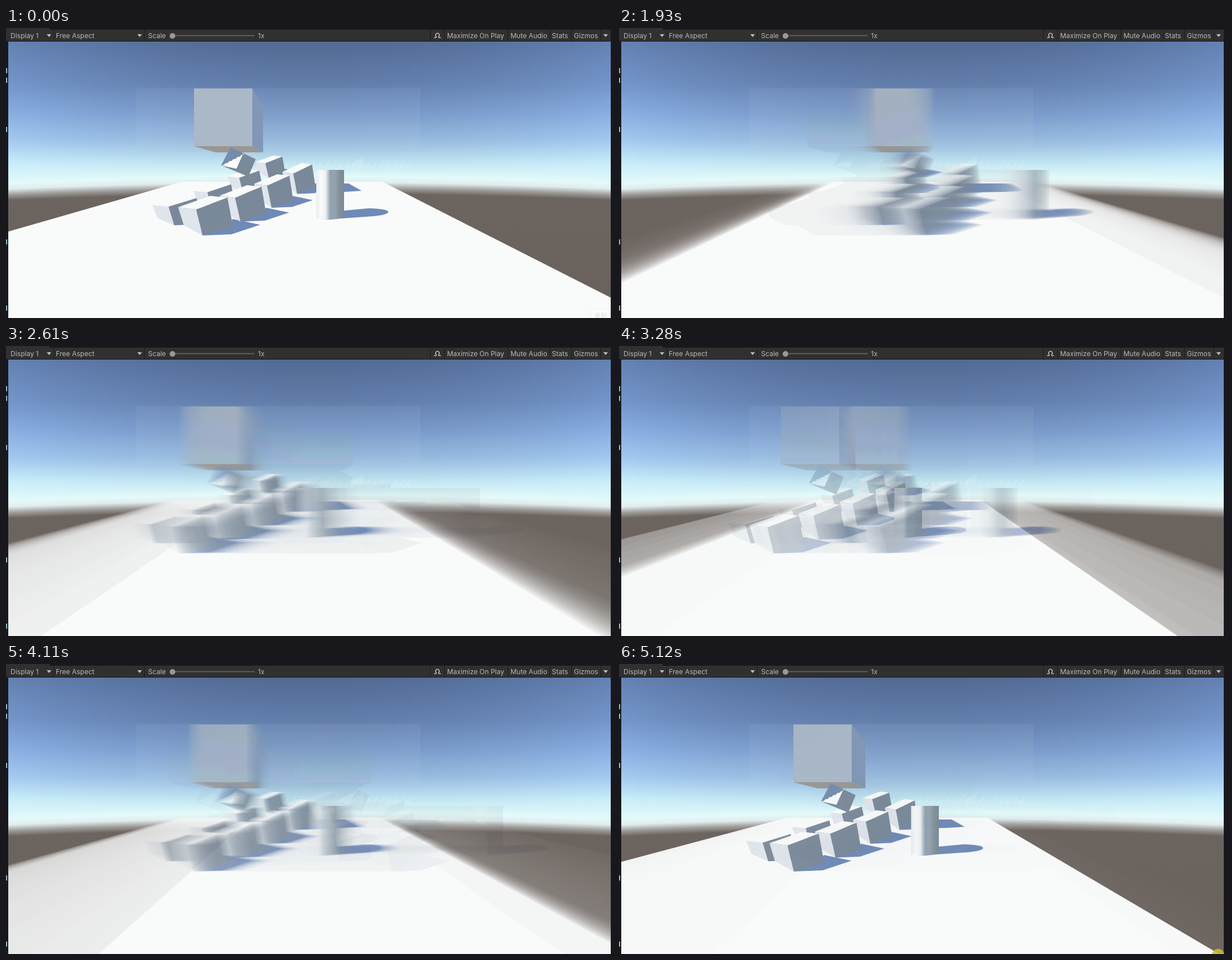
An HTML page with a canvas for the animation above (5200 ms loop, 1072x513 px).

```html
<!DOCTYPE html>
<html lang="en">
<head>
<meta charset="utf-8">
<title>Game view</title>
<style>
  html, body { margin: 0; width: 100%; height: 100%; overflow: hidden; background: #17191f; }
  canvas, svg { position: absolute; left: 0; top: 0; width: 1072px; height: 513px; }
  svg text { font: 12px Inter, "Open Sans", sans-serif; fill: #b9b9b9; }
  #hintText { font-family: "Noto Sans CJK SC", "Noto Sans CJK", sans-serif; fill: #dcdfe0; }
</style>
</head>
<body>
<canvas id="view" width="1072" height="513"></canvas>
<svg viewBox="0 0 1072 513">
  <rect width="1072" height="24" fill="#191919"/>
  <rect y="3" width="1068" height="20" fill="#303030"/>
  <rect width="77" height="4" fill="#303030"/>
  <path d="M84.5 3V23M244.5 3V23M749.5 3V23M774.5 3V23M886.5 3V23M960.5 3V23M998.5 3V23M1050.5 3V23" stroke="#1d1d1d"/>
  <text x="8" y="18">Display 1</text>
  <text x="88" y="18">Free Aspect</text>
  <text x="251" y="18">Scale</text>
  <text x="445" y="18">1x</text>
  <text x="779" y="18">Maximize On Play</text>
  <text x="891" y="18">Mute Audio</text>
  <text x="964" y="18">Stats</text>
  <text x="1003" y="18">Gizmos</text>
  <path d="M72 11h8l-4 5zM232 11h8l-4 5zM1055 11h8l-4 5z" fill="#bdbdbd"/>
  <path d="M294 13.5H439" stroke="#5e5e5e" stroke-width="2"/>
  <circle cx="294" cy="14" r="5" fill="#999"/>
  <path d="M756 17h3.500q1-1-.5-3a3.300 3.300 0 1 1 6 0q-1.500 2-.5 3h3.500" fill="none" stroke="#c4c4c4" stroke-width="1.500"/>
  <g id="hint">
    <rect x="1032.500" y="497.500" width="35" height="20" fill="#fff" fill-opacity=".3" stroke="#eceff0"/>
    <text id="hintText" x="1038" y="514">录制</text>
  </g>
  <circle id="pointer" cx="1058" cy="515" r="11" fill="#c8be30" fill-opacity=".9"/>
</svg>
<script>
const W = 1072, H = 513, LOOP = 5200, START = 1400, STEP = 67.6, LAST = 55;
const FADE = .5; // decay of the motion blur per step
const SLATE = '#7a8999', SHADE = '#708ab7', LIGHT = '#dfe5eb', WHITE = '#f9fbfb';
const $ = id => document.getElementById(id);

function layer(canvas = document.createElement('canvas')) {
  canvas.width = W;
  canvas.height = H;
  return canvas.getContext('2d');
}
const view = layer($('view')), blur = layer(), scene = layer(), sky = layer();

// Camera turning points: step, offset
const PATH = [
  [0, 0], [4, 88], [8, 137], [11, 201], [12, 201], [14.5, 25], [18, -30], [21, -52],
  [26.2, -52], [26.7, 60], [28, 90], [32, 236], [35, 236], [37, 20], [40, -12],
  [43, -45], [46, 90], [49, -27], [LAST, -27]
];

function offsetAt(n) {
  const i = Math.max(1, PATH.findIndex(p => p[0] >= n));
  const [a, from] = PATH[i - 1], [b, to] = PATH[i];
  return from + (to - from) * (n - a) / (b - a);
}

function paintSky() {
  const stops = {
    24: [82, 106, 147], 100: [98, 126, 171], 150: [119, 151, 197], 200: [150, 185, 220],
    240: [194, 229, 241], 263: [228, 250, 250], 273: [224, 236, 236],
    283: [160, 158, 155], 293: [108, 100, 95], 513: [106, 97, 92]
  };
  for (let x = 0; x < W; x += 4) {
    const side = ((x - W / 2) / (W / 2)) ** 2;
    const g = sky.createLinearGradient(0, 0, 0, H);
    for (const y in stops) {
      const gain = 1 + .22 * side * Math.max(0, 1 - (y / 263) ** 2);
      const drop = y > 260 && y < H ? 12 * side : 0;
      g.addColorStop((+y + drop) / H, `rgb(${stops[y].map(c => Math.round(c * gain))})`);
    }
    sky.fillStyle = g;
    sky.fillRect(x, 0, 4, H);
  }
  sky.fillStyle = 'rgba(205,222,235,.065)';
  sky.fillRect(230, 106, 502, 103);
  sky.fillRect(230, 208, 502, 1);
  sky.fillStyle = 'rgba(235,248,252,.18)';
  sky.fill(new Path2D('M607 243L633 225L626 249z'));
  for (let x = 440; x < 705; x += 12) {
    sky.fill(new Path2D(`M${x} 247l12-14l-3 14z`));
  }
}

// Near things slide further than far ones
const depthOf = y => (y - 220) / 100;

// Points are [x, y] or [x, y, depth]
function poly(s, depth, fill, ...points) {
  scene.fillStyle = fill;
  scene.beginPath();
  for (const [x, y, own = depth] of points) scene.lineTo(x + s * own, y);
  scene.fill();
}

// A leaning cube, placed by its nearest foot
function block(s, x, y, w, h) {
  const depth = depthOf(y) - .05;
  const at = (dx, dy) => [x + dx * w, y + dy * h];
  const left = at(-43, -50), right = at(44, -67), edge = at(-11, -46), foot = [x, y];
  poly(s, depth, WHITE, left, at(14, -70), right, edge);
  poly(s, depth, LIGHT, left, edge, foot, at(-33, -18));
  poly(s, depth, SLATE, edge, right, at(54, -15), foot);
}

function blockShadow(s, x, y, w) {
  const at = (dx, dy) => [x + dx * w, y + dy * w];
  poly(s, depthOf(y) - .05, SHADE, [x, y], at(51, -2), at(102, -19), at(54, -29));
}

// Two receding rows of four
function paintBlocks(s) {
  for (const draw of [blockShadow, block]) {
    for (let i = 3; i >= 0; i--) {
      const x = 67 * (1 - .82 ** i) / .18, w = .845 ** i, h = .92 ** i;
      draw(s, 297 + x, 349 - 28 * i, .9 * w, .72 * h);
      draw(s, 347 + x, 367 - 24.5 * i, w, h);
    }
  }
}

function paintCylinder(s) {
  const x = 548 + 1.19 * s;
  scene.fillStyle = SHADE;
  scene.fill(new Path2D(`M${x + 14} 339L${x + 100} 333C${x + 135} 330 ${x + 140} 320 ${x + 92} 319L${x + 49} 323z`));
  const g = scene.createLinearGradient(x, 0, x + 49, 0);
  ['#e9eef1', '#f8fafb', '#eef2f3', '#8fa3af', '#94a3ae', '#82909c', SLATE]
    .forEach((c, i) => g.addColorStop(i / 6, c));
  scene.fillStyle = g;
  scene.fill(new Path2D(`M${x} 251h49v84q-24 7-49 2z`));
}

function paintFloating(s) {
  const near = .89, far = .7;
  poly(s, near, '#8097b5', [435, 107], [454, 139, far], [454, 220, far], [435, 209]);
  poly(s, near, '#9a9793', [332, 209], [435, 209], [454, 220, far], [370, 220, far]);
  poly(s, near, '#abb8c7', [332, 107], [435, 107], [435, 209], [332, 209]);

  const d = .85, stairs = [];
  for (let i = 0; i <= 5; i++) {
    const x = 380 + 7 * i, y = 243 - 3.6 * i;
    stairs.push([x, y], [x + 5, y - 1]);
  }
  poly(s, d, SLATE, [397, 211], [441, 232], [428, 263], [380, 243]);
  poly(s, d, '#758caf', [380, 243], [397, 211], [419, 222]);
  poly(s, d, WHITE, ...stairs, [419, 222], [407, 249]);
}

function paintScene(s) {
  scene.drawImage(sky.canvas, 0, 0);
  const ground = [[310, 272], [665, 272], [1139, 513], [-528, 513]];
  poly(s, 0, WHITE, ...ground.map(([x, y]) => [x, y, depthOf(y)]));
  poly(s, .65, SHADE, [535, 291], [596, 290], [628, 288], [605, 275], [540, 275]);
  paintBlocks(s);
  paintCylinder(s);
  paintFloating(s);
}

// Blend one step of camera travel into the picture
function expose(n) {
  const travel = Math.abs(offsetAt(n) - offsetAt(n - 1));
  const count = Math.min(8, 1 + Math.ceil(travel / 5));
  blur.globalAlpha = 1 - Math.exp(-FADE / count);
  for (let i = 1; i <= count; i++) {
    paintScene(offsetAt(n - 1 + i / count));
    blur.drawImage(scene.canvas, 0, 0);
  }
}

function paintEdges() {
  view.fillStyle = '#17191f';
  view.fillRect(0, 0, 4, H);
  view.fillRect(1068, 0, 4, H);
  view.fillStyle = '#8fb4c8';
  for (const y of [71, 88, 175, 374, 491]) view.fillRect(0, y, 2, 9);
}

let shown = Infinity;

// Steps always build up from the resting picture, so each depends on time alone
function showStep(n) {
  if (n < shown) {
    paintScene(0);
    blur.globalAlpha = 1;
    blur.drawImage(scene.canvas, 0, 0);
    shown = 0;
  }
  while (shown < n) expose(++shown);
  view.drawImage(blur.canvas, 0, 0);
  paintEdges();
}

const t0 = performance.now();

function tick() {
  const t = (performance.now() - t0) % LOOP;
  const n = Math.min(LAST, Math.max(0, Math.floor((t - START + 14) / STEP)));
  if (n !== shown) showStep(n);
  $('hint').style.display = t < START ? '' : 'none';
  $('hintText').style.display = t < 70 ? '' : 'none';
  $('pointer').style.display = t >= 5115 ? '' : 'none';
  requestAnimationFrame(tick);
}

paintSky();
tick();
</script>
</body>
</html>
```
